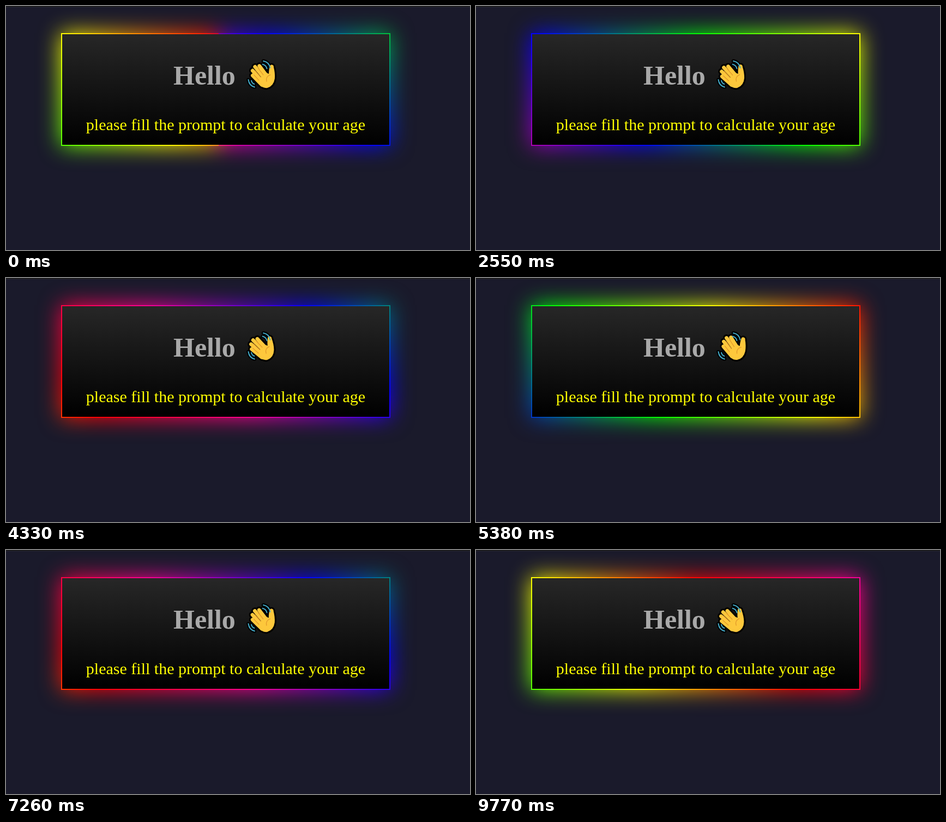
An HTML page for the animation above (9850 ms loop, 851x450 px).

```html
<!DOCTYPE html>
<html lang="en">
<head>
<meta charset="utf-8">
<title>Age prompt</title>
<style>
  html, body { margin: 0; width: 100%; height: 100%; overflow: hidden; background: #1a1a2b; }
  .stage { position: relative; width: 851px; height: 450px; overflow: hidden; }
  .stage > * { position: absolute; }
  .top-line { left: 0; top: 0; width: 851px; height: 1px; background: #0d0d0f; border-bottom: 1px solid #2b2b2f; }
  .rainbow {
    left: 101px; top: 50px; width: 604px; height: 208px;
    background: linear-gradient(45deg, #fb0094, #00f, #0f0, #ff0, #f00, #fb0094, #00f, #0f0, #ff0, #f00);
    background-size: 400% 100%;
  }
  .glow { filter: blur(20px); }
  .card { left: 103px; top: 52px; width: 600px; height: 204px; background: linear-gradient(0deg, #000, #272727); }
  svg { left: 0; top: 0; }
  text { font-family: "Liberation Serif", "Times New Roman", serif; }
  .hello { font-size: 50px; font-weight: bold; fill: #a9a9a9; }
  .prompt { font-size: 30px; fill: #ff0; text-anchor: middle; }
  .line { fill: none; stroke-linecap: round; stroke-linejoin: round; }
  .outline { stroke: #000; }
</style>
</head>
<body>
<div class="stage">
  <div class="top-line"></div>
  <div class="rainbow"></div>
  <div class="rainbow glow"></div>
  <div class="card"></div>
  <svg width="851" height="450" viewBox="0 0 851 450">
    <defs>
      <path id="fingers" d="M465 110.500L480 131M457 112L475 134M452.500 119L471 140M452.500 128L469 145"/>
      <path id="thumb" d="M487.500 112Q485 121 486 131"/>
      <path id="palm" d="M464 136L477 124L484 127L490 112Q493 124 492 134Q490 147 479 150Q473 151 467 146Z"/>
      <path id="arcs" d="M472 101.500Q482 103 484.500 114M470.500 107.500Q477 109 478.500 115.500M444.500 136Q446 147 456 149.500M450 137.500Q451 142.500 455.500 144"/>
    </defs>
    <text class="hello" x="307" y="145">Hello</text>
    <text class="prompt" x="403" y="229">please fill the prompt to calculate your age</text>
    <g class="line">
      <use href="#arcs" class="outline" stroke-width="6.500"/>
      <g id="hand">
        <g class="outline">
          <use href="#fingers" stroke-width="13"/>
          <use href="#thumb" stroke-width="13"/>
          <use href="#palm" stroke-width="8" fill="#000"/>
        </g>
        <g stroke="#fdc83c">
          <use href="#fingers" stroke-width="6.800"/>
          <use href="#thumb" stroke-width="7"/>
          <use href="#palm" stroke-width="2" fill="#fdc83c"/>
        </g>
        <path stroke="#e39a2c" stroke-width="1.300" d="M463 115L472 127M457 119L467 131M455 127L464 137M485 127Q476 130 478 139"/>
      </g>
      <use href="#arcs" stroke="#43a9c6" stroke-width="2"/>
    </g>
  </svg>
</div>
<script>
  const LOOP = 9850, HOLD = 190, STEP = 78.525;
  const layers = document.querySelectorAll('.rainbow');
  const hand = document.getElementById('hand');

  // step, gradient shift in px, wave cycles
  const keys = [
    [0, 289, -2.74], [21, 1672, 0], [43, 3007, 2.70], [55, 3734, 4.45],
    [73.9, 4832, 6.92], [80, 4478, 7.72], [104, 2997, 10.83], [124, 1749, 13.45]
  ];

  const stepAt = t => t < HOLD ? 0 : Math.floor((t - HOLD) / STEP + 0.3) + 2;

  function sample(step) {
    let i = 1;
    while (i < keys.length - 1 && step > keys[i][0]) i++;
    const a = keys[i - 1], b = keys[i];
    const u = Math.min(1, (step - a[0]) / (b[0] - a[0]));
    return [1, 2].map(c => a[c] + (b[c] - a[c]) * u);
  }

  function draw(now) {
    const [shift, wave] = sample(stepAt(now % LOOP));
    for (const layer of layers) layer.style.backgroundPosition = `${shift % 2416}px 0`;
    const angle = 7 * Math.cos(2 * Math.PI * wave);
    hand.setAttribute('transform', `rotate(${angle.toFixed(2)} 478 146)`);
  }

  const start = performance.now();
  function tick() {
    draw(performance.now() - start);
    requestAnimationFrame(tick);
  }
  tick();
</script>
</body>
</html>
```
